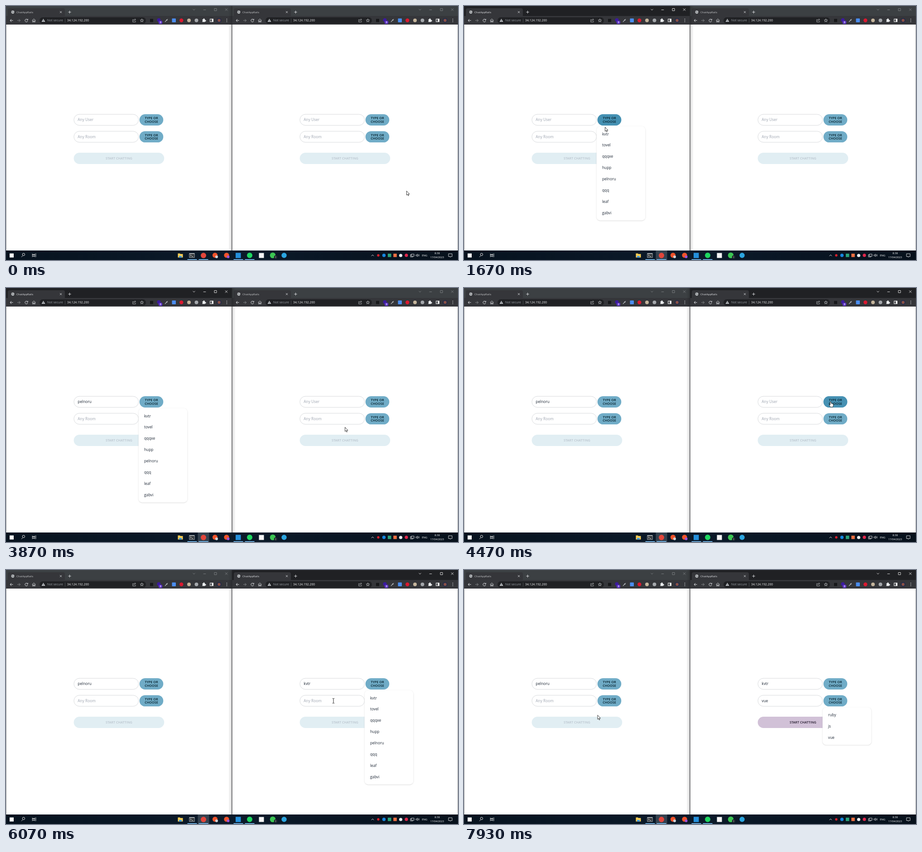
An HTML page with a canvas for the animation above (8 s loop, 998 by 561 pixels).

```html
<!DOCTYPE html>
<html lang="en">
<head>
<meta charset="utf-8">
<title>ChatAppRails</title>
<style>
html, body { margin: 0; width: 100%; height: 100%; overflow: hidden; background: #fff; }
canvas { display: block; }
</style>
</head>
<body>
<canvas id="stage" width="998" height="561"></canvas>
<script>
const ctx = document.getElementById('stage').getContext('2d');
const LOOP = 8000, HALF = 499;
const USERS = ['kvtr', 'tovel', 'qqqxe', 'hupp', 'pelnoru', 'qqq', 'leaf', 'gabvi'];
const ROOMS = ['ruby', 'js', 'vue'];
const INK = '#1f2937', BLUE = '#70acc7', BLUE_DARK = '#4691b3';

// Pointer tip: time, x, y
const POINTER = [
  [0, 884.5, 408.5], [70, 884.5, 408.5], [800, 312, 251], [1330, 312, 251],
  [1670, 311.5, 267.5], [2130, 309, 357], [2470, 341, 385], [2610, 341, 385],
  [2670, 345, 385], [2810, 345, 385], [2870, 344, 385], [3230, 344, 385],
  [3870, 748.5, 307.5], [4000, 778, 282], [4240, 778, 282], [4440, 809.5, 251],
  [4720, 809.5, 251], [5070, 807, 283], [5130, 807, 284], [5200, 808, 286],
  [5800, 808, 286], [6060, 723, 289], [6330, 723, 289], [6620, 811, 287],
  [6830, 811, 287], [7060, 814, 318.5], [7130, 814, 318.5], [7300, 812, 369.5],
  [7430, 812, 369.5], [7920, 295, 320.5]
];

const clamp = v => Math.max(0, Math.min(1, v));
const fade = (t, on, off = 1e9) => clamp((t - on) / 200) * clamp(1 - (t - off) / 200);

function pointerAt(t) {
  let i = POINTER.findIndex(k => k[0] > t);
  if (i < 0) return POINTER.at(-1).slice(1);
  const [t0, x0, y0] = POINTER[i - 1], [t1, x1, y1] = POINTER[i];
  const u = (t - t0) / (t1 - t0), e = u * u * (3 - 2 * u);
  return [x0 + (x1 - x0) * e, y0 + (y1 - y0) * e];
}

function box(x, y, w, h, color, r = 0) {
  ctx.fillStyle = color;
  ctx.beginPath();
  ctx.roundRect(x, y, w, h, r);
  ctx.fill();
}

function dot(x, y, r, color) {
  box(x - r, y - r, 2 * r, 2 * r, color, r);
}

function text(s, x, y, size, color, align = 'left', weight = 400) {
  ctx.font = `${weight} ${size}px "Open Sans", "Noto Sans", sans-serif`;
  ctx.textAlign = align;
  ctx.fillStyle = color;
  ctx.fillText(s, x, y);
}

function icon(d, x, y, stroke, fill, width = 1) {
  const path = new Path2D(d);
  ctx.save();
  ctx.translate(x, y);
  ctx.lineWidth = width;
  if (fill) { ctx.fillStyle = fill; ctx.fill(path); }
  if (stroke) { ctx.strokeStyle = stroke; ctx.stroke(path); }
  ctx.restore();
}

function withAlpha(a, draw) {
  if (a <= 0) return;
  ctx.save();
  ctx.globalAlpha = a;
  draw();
  ctx.restore();
}

function browser(active) {
  const frame = active ? '#202124' : '#3c4043';
  const control = active ? '#fff' : '#85888b';
  const pale = '#e3e5e8', grey = '#9aa0a6';
  box(0, 0, HALF, 23, frame);
  box(4, 5, 126, 20, '#35363a', 4);
  box(0, 22, HALF, 19.5, '#35363a');
  dot(15, 13.5, 3.4, '#c4c7ca');
  icon('M-2.5-1Q0 0 1-2.5M-2 2Q0-1 3 1', 15, 13.5, '#55585c', null, .9);
  text('ChatAppRails', 23, 15.7, 6, active ? '#e3e5e8' : '#c6c8ca');
  icon('M-2-2L2 2M2-2L-2 2', 121, 13.5, pale, null, .9);
  icon('M-3.2 0H3.2M0-3.2V3.2', 140.5, 13.5, pale, null, .9);
  icon('M-2.5-1.2L0 1.2L2.5-1.2', 415, 8, control, null, .8);
  icon('M-2.8 0H2.8', 438.5, 8.5, control, null, .8);
  icon('M-2.5-2.5H2.5V2.5H-2.5Z', 462.5, 8, control, null, .8);
  icon('M-2.6-2.6L2.6 2.6M2.6-2.6L-2.6 2.6', 486.5, 8, control, null, .8);

  icon('M3.5 0H-3M0-3L-3 0L0 3', 12, 32, pale);
  icon('M-3.5 0H3M0-3L3 0L0 3', 28.5, 32, '#85888b');
  icon('M2.6-1.7A3.1 3.1 0 1 0 3 1M3.2-3.5V-1H.7', 45, 32, pale);
  icon('M-3.8 0L0-3.5L3.8 0M-2.7-.5V3.3H-.8V.8H.8V3.3H2.7V-.5', 61.5, 32, pale, null, .9);
  box(74, 25, 235, 14, '#202124', 7);
  icon('M0-3.5L4 3.4H-4Z', 82.5, 31.5, null, '#bdc1c6');
  icon('M0-1V1M0 1.7V2.5', 82.5, 31.5, '#202124', null, .8);
  text('Not secure', 91, 34.2, 6.9, grey);
  box(130, 27.5, .7, 9, '#5f6368');
  text('34.124.192.200', 135, 34.2, 6.8, '#f1f3f4');
  icon('M-1-2H-3.2V3.3H3V1M-1 1Q-1-2 2-2M1-4L3.5-2L1 0', 283, 32, '#c4c7ca', null, .8);
  icon('M0-3.6L1-1.2L3.6-1L1.6.7L2.3 3.2L0 1.8L-2.3 3.2L-1.6.7L-3.6-1L-1-1.2Z', 300, 32, '#d5d7da', null, .8);

  box(318, 28.5, 7, 7, '#17181a');
  dot(337.5, 31, 4, '#3b1a9c');
  box(337, 32.5, 8, 7, '#5a2fc4', 1.5);
  text('3', 341, 38.2, 5.5, '#fff', 'center', 700);
  icon('M-3 3L1-1M0-2L2.2.2M1.4-1.4L3-3', 354, 32, '#b9bcc0', null, 1.2);
  box(366.5, 27.5, 8.5, 8.5, '#4b8df0', 1);
  dot(387.3, 31.7, 4.2, '#dc1930');
  dot(404, 31.7, 4, '#c5b59c');
  dot(420.5, 31.7, 4, '#a5a8ac');
  icon('M-3.5-2H-1.3A1.4 1.4 0 1 1 1.3-2H2.7V0A1.4 1.4 0 1 1 2.7 2.3V3.8H-3.5V2A1.4 1.4 0 0 0-3.5-.5Z', 437, 31.5, null, '#eceef0');
  icon('M-3.3-3H3.3V3H-3.3Z', 454, 31.7, '#fff', null, 1.1);
  box(454.3, 28.5, 3.2, 6.4, '#fff');
  dot(470.5, 31.7, 5.3, '#242b4a');
  dot(470.5, 31.7, 3.2, '#8a5145');
  for (const y of [28.7, 31.7, 34.7]) dot(487.5, y, .8, pale);
}

function field(y, value, hint, ring) {
  if (ring) {
    ctx.strokeStyle = '#d2d4d7';
    ctx.lineWidth = 1;
    ctx.beginPath();
    ctx.roundRect(147.5, y - 14.5, 147.5, 29, 14.5);
    ctx.stroke();
  }
  ctx.strokeStyle = '#cfd1d5';
  ctx.lineWidth = .8;
  ctx.beginPath();
  ctx.roundRect(149.9, y - 12.2, 142.8, 24.4, 12.2);
  ctx.stroke();
  text(value || hint, 158.3, y + 3, 8.32, value ? INK : '#9ca3af');
}

function chooser(y, hover) {
  box(294.7, y - 12.4, 52.6, 24.9, BLUE, 12.4);
  withAlpha(hover, () => box(294.7, y - 12.4, 52.6, 24.9, BLUE_DARK, 12.4));
  text('TYPE OR', 321, y - 1.1, 7.28, '#06202b', 'center', 600);
  text('CHOOSE', 321, y + 6.2, 7.28, '#06202b', 'center', 600);
}

function menu(items, top, alpha, pressed, press) {
  withAlpha(alpha, () => {
    ctx.save();
    ctx.shadowColor = 'rgba(0,0,0,.17)';
    ctx.shadowBlur = 2;
    ctx.shadowOffsetY = .6;
    box(292.6, top, 108, items.length * 24.96 + 8.3, '#fff', 8.3);
    ctx.restore();
    items.forEach((name, i) => {
      const y = top + 4.2 + i * 24.96;
      if (i === pressed) {
        withAlpha(press, () => box(296.8, y, 99.6, 24.9, BLUE, 8));
      }
      text(name, 305, y + 15.5, 8.32, INK);
    });
  });
}

function page(s) {
  box(0, 41, HALF, 499, '#fff');
  field(251.4, s.user, 'Any User');
  field(288.8, s.room, 'Any Room', s.ring);
  chooser(251.4, s.userHover);
  chooser(288.8, s.roomHover);
  const ready = s.user && s.room;
  box(149.6, 324, 199.7, 25, ready ? '#d1c1d7' : '#e1eef3', 12.5);
  text('START CHATTING', 249.4, 339.2, 7.28, ready ? '#21182a' : '#bac4ce', 'center', 600);
  menu(USERS, 265.8, s.userMenu, s.pressed, s.press);
  menu(ROOMS, 303.3, s.roomMenu, s.pressed, s.press);
}

function taskbar(focused) {
  const sky = ctx.createLinearGradient(0, 0, 998, 0);
  sky.addColorStop(0, '#07131f');
  sky.addColorStop(.5, '#0b1a2a');
  sky.addColorStop(1, '#07111c');
  box(0, 540, 998, 21, sky);
  if (focused) box(423.5, 540, 25, 21, '#35424f');
  box(8, 546.5, 9, 9, '#fff');
  icon('M-.5 1L-3.5 4M4-1.7A2.7 2.7 0 1 1-1.4-1.7A2.7 2.7 0 1 1 4-1.7', 37.5, 550.5, '#fff', null, .9);
  icon('M-4-3.5V-2H2V-3.5M-4 4V2.5H2V4M-4-1H2V1.5H-4ZM4-4V4', 62, 550.5, '#e4e6e8', null, .8);
  icon('M-5.5-4.5H-1L0-3.3H5.5V4.5H-5.5Z', 385, 551, null, '#f7cd55');
  box(382, 552, 6, 3.5, '#3d9be0');
  box(404.5, 546, 12, 10, '#d6d8da', .7);
  box(405.2, 547.5, 10.6, 7.8, '#33383c');
  icon('M-3-2L-1 0L-3 2M0 2H3', 410, 551, '#fff', null, .9);
  dot(436, 551, 6, '#e2463b');
  for (const [x, badge] of [[461.5, '#cfd2d6'], [487, '#9c53d8']]) {
    dot(x, 550.5, 5.6, '#f1532b');
    dot(x + 3.5, 554, 3, badge);
  }
  box(507, 545.2, 11.5, 11.5, '#2490dc');
  dot(538, 550.7, 6, '#1ed760');
  box(558.5, 545.5, 11, 11, '#f5f5f5');
  dot(589, 550.7, 6.3, '#3cc553');
  dot(595.5, 554.5, 3.8, '#20282e');
  text('1', 595.5, 556.5, 5.5, '#fff', 'center');
  dot(614, 550.7, 5.7, '#2ba5e0');
  for (const x of [400.5, 425.5, 502.5, 527.5]) box(x, 559.3, 21, 1.7, '#76b9ed');

  icon('M-2.7 1.3L0-1.4L2.7 1.3', 809.5, 551, '#fff', null, .9);
  dot(822, 550.7, 2.7, '#d3202c');
  dot(834.5, 550.7, 3.7, '#1686e0');
  box(843, 547, 7.5, 7.5, '#29a37a');
  box(855.3, 547, 7.5, 7.5, '#ed7042');
  dot(871.5, 551, 3.6, '#e9edf0');
  dot(884, 550.7, 3.6, '#e0274c');
  icon('M-2-2.7H4V2H-2ZM-4-1.5H-2M-4-1.5V3.5H2', 897, 550.7, '#fff', null, .8);
  icon('M-4-1H-2.4L-.5-2.8V2.8L-2.4 1H-4ZM1-1.3Q2 0 1 1.3M2.4-2.5Q4.2 0 2.4 2.5', 909, 550.7, '#fff', null, .7);
  text('ENG', 924.3, 552.8, 6, '#fff', 'center');
  text('8:38', 952, 548.2, 5.8, '#fff', 'center');
  text('17/04/2023', 952, 557.2, 5.7, '#fff', 'center');
  icon('M-4-3.5H4V2.7H1.5L0 4.3V2.7H-4Z', 981, 550.7, '#fff', null, .8);
}

function pointer(x, y, sides) {
  const right = x >= HALF, lx = right ? x - HALF : x, s = sides[+right];
  const within = (x0, y0, x1, y1) => lx >= x0 && lx <= x1 && y >= y0 && y <= y1;
  const onItem = (s.userMenu > 0 && within(297, 270, 397, 470)) ||
                 (s.roomMenu > 0 && within(297, 307.5, 397, 382.5));
  const rows = [239, 276.4];
  if (onItem || rows.some(r => within(295, r, 347, r + 25))) {
    icon('M-1.1 6V.6Q0-.6 1.1.6V4Q2.2 3.2 3 4.4Q4 3.8 4.6 5Q5.8 4.7 5.8 6.2V8.5Q5.8 10 4.8 12H-.5Q-1.2 10.5-3.2 7.8Q-3.4 6.2-1.1 7.5Z', x, y, '#111', '#fff', .8);
  } else if (rows.some(r => within(150, r, 292, r + 25))) {
    icon('M-2.2-5.2H-.6L0-4.6L.6-5.2H2.2M0-4.6V4.6M-2.2 5.2H-.6L0 4.6L.6 5.2H2.2', x, y, '#222', null, 1);
  } else {
    icon('M0 0V9.3L2.1 7.4L3.6 10.7L5 10.1L3.5 6.9H6.4Z', x, y, '#111', '#fff', .8);
  }
}

function edgeShadow(x, dir) {
  const g = ctx.createLinearGradient(x, 0, x + dir * 8, 0);
  g.addColorStop(0, 'rgba(0,0,0,.16)');
  g.addColorStop(1, 'rgba(0,0,0,0)');
  box(Math.min(x, x + dir * 8), 0, 8, 540, g);
}

function draw(t) {
  const leftActive = t >= 860 && t < 4390, rightActive = t >= 4390;
  const sides = [{
    user: t >= 3200 && 'pelnoru',
    userHover: fade(t, 720, 1670), roomHover: 0,
    userMenu: fade(t, 900, 4260), roomMenu: 0,
    pressed: 4, press: t >= 3200 ? fade(t, 3050, 3200) : 0
  }, {
    user: t >= 5800 && 'kvtr',
    room: t >= 7400 && 'vue',
    ring: t >= 6270 && t < 6750,
    userHover: fade(t, 4260, 4850), roomHover: fade(t, 6540, 7070),
    userMenu: fade(t, 4500, 6270), roomMenu: fade(t, 6770),
    pressed: t < 6500 ? 0 : 2,
    press: t < 6500 ? fade(t, 5720, 5850) : fade(t, 7300, 7420)
  }];
  sides.forEach((side, i) => {
    ctx.save();
    ctx.translate(i * HALF, 0);
    browser(i ? rightActive : leftActive);
    page(side);
    ctx.restore();
  });
  if (leftActive) edgeShadow(HALF, 1);
  else edgeShadow(HALF, -1);
  box(0, 41, .6, 499, '#55585b');
  box(498.3, 0, 1.2, 540, '#2b2c2f');
  box(997.4, 41, .6, 499, '#55585b');
  taskbar(leftActive || rightActive);
  pointer(...pointerAt(t), sides);
}

function tick(now) {
  draw(now % LOOP);
  requestAnimationFrame(tick);
}
requestAnimationFrame(tick);
</script>
</body>
</html>
```
